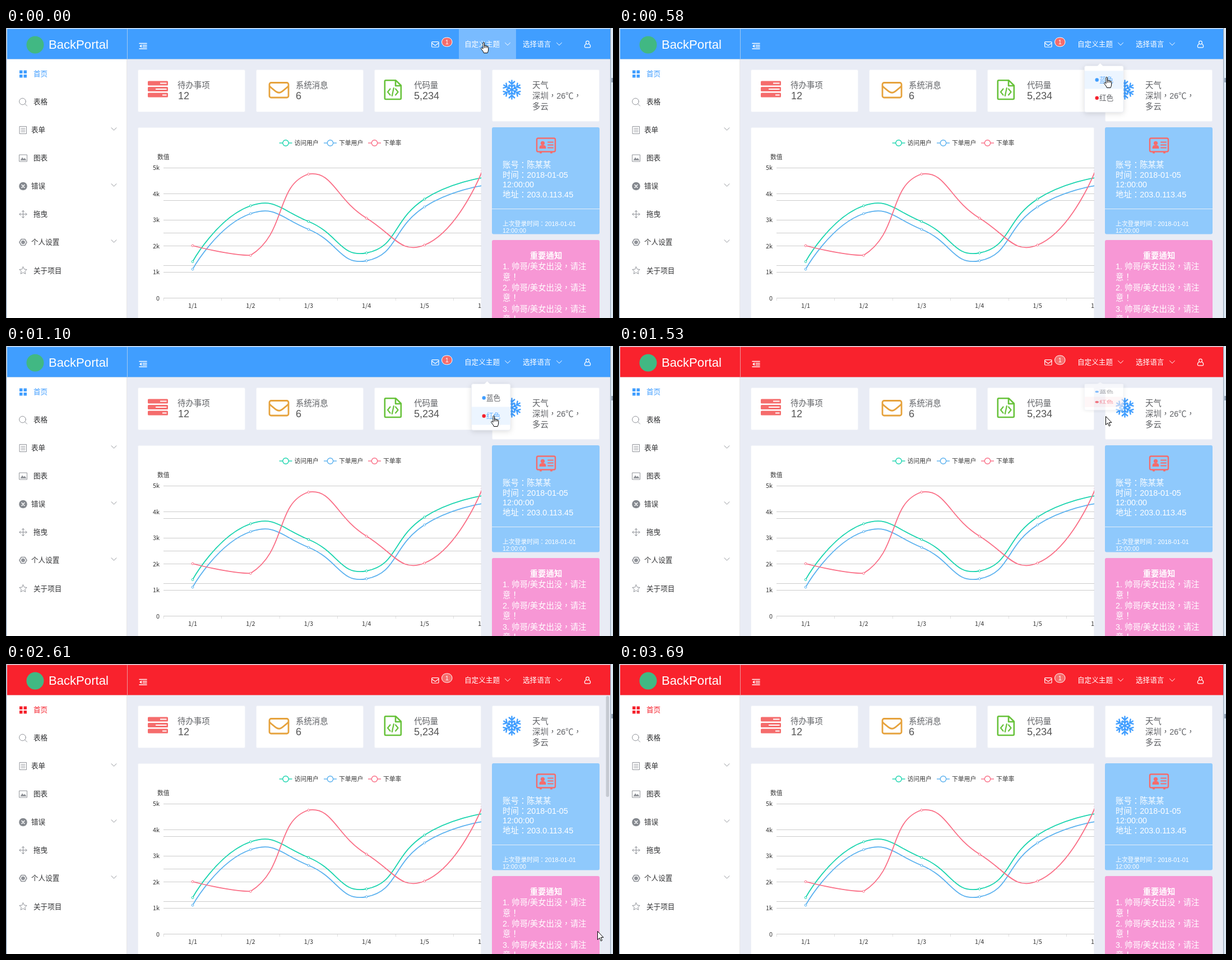
Animation of 1083 by 517 pixels, one loop 3720 ms. Source, as an HTML page:

```html
<!DOCTYPE html>
<html lang="zh-CN">
<head>
<meta charset="utf-8">
<title>Dashboard theme switch</title>
<style>
html, body { margin: 0; height: 100%; overflow: hidden; background: #e9ecf5; }
#stage {
  display: block; width: 100vw; height: 100vh;
  font: 12.6px 'Liberation Sans', 'Noto Sans CJK SC', 'Noto Sans CJK', sans-serif;
  --theme: #409eff; --active: #409eff; --hot: #66b1ff; --hotBg: #ecf5ff;
}
#stage, .play { animation: 3720ms step-end infinite; }
#stage { animation-name: theme; }
.line { fill: none; stroke: currentColor; stroke-linecap: round; stroke-linejoin: round; }
.white { fill: #fff; color: #fff; }
.side { fill: #303133; color: #909399; }
.active { fill: var(--active); }
/* Traditional forms centre the full-width punctuation. */
.centred { font-family: 'Liberation Sans', 'Noto Sans CJK TC', 'Noto Sans CJK', sans-serif; }
.mid { font-size: 14.4px; fill: #606266; }
.num { font-size: 18px; fill: #555; }
.note { font-size: 14.4px; fill: #fff; }
.small { font-size: 10.8px; fill: #fff; }
.chart { font: 10.8px 'Noto Sans CJK SC', 'Noto Sans CJK', 'Noto Sans', sans-serif; fill: #333; }
.card { fill: #fff; stroke: #f1f3f8; }
#navHover { opacity: 1; animation-name: navHover; }
#menu { opacity: 0; transform-origin: 0 67px; animation-name: menu; }
#menu > rect:first-of-type { filter: drop-shadow(0 2px 5px rgba(0,0,0,.13)); }
#back1 { fill: transparent; animation-name: back1; }
#back2 { fill: transparent; animation-name: back2; }
#item1 { fill: #606266; animation-name: item1; }
#item2 { fill: #606266; animation-name: item2; }
#lift { opacity: 0; filter: drop-shadow(0 2px 5px rgba(0,0,0,.14)); animation-name: lift; }
#scroll { opacity: 0; animation-name: scroll; }
#cursor { fill: #fff; stroke: #000; stroke-linejoin: round; animation-name: move; }
#hand { animation-name: hand; }
#arrow { animation-name: arrow; }

@keyframes theme {
  0% { --theme: #409eff; --active: #409eff; --hot: #66b1ff; --hotBg: #ecf5ff; }
  41.128% { --theme: #f9222d; --active: #409eff; --hot: #f5485a; --hotBg: #fdf0f2; }
  45.161% { --theme: #f9222d; --active: #a25d92; --hot: #f5485a; --hotBg: #fdf0f2; }
  48.655%, 100% { --theme: #f9222d; --active: #f5222d; --hot: #f5485a; --hotBg: #fdf0f2; }
}
@keyframes navHover { 0% { opacity: 1 } 12.365% { opacity: .5 } 15.591%, 100% { opacity: 0 } }
@keyframes menu {
  0% { opacity: 0; transform: scaleY(.9) }
  4.301% { opacity: .85; transform: scaleY(.92) }
  8.333% { opacity: 1; transform: none }
  41.128% { opacity: .6; transform: scaleY(.57) }
  45.161%, 100% { opacity: 0; transform: scaleY(.1) }
}
@keyframes back1 { 0%, 22.043% { fill: transparent } 15.591% { fill: var(--hotBg) } }
@keyframes item1 { 0%, 22.043% { fill: #606266 } 15.591% { fill: var(--hot) } }
@keyframes back2 { 0% { fill: transparent } 22.043%, 100% { fill: var(--hotBg) } }
@keyframes item2 { 0% { fill: #606266 } 22.043%, 100% { fill: var(--hot) } }
@keyframes lift { 0%, 62.903% { opacity: 0 } 45.161% { opacity: .5 } 48.655% { opacity: 1 } }
@keyframes scroll {
  0%, 99.193%, 100% { opacity: 0 }
  45.161% { opacity: .5 } 48.655% { opacity: 1 } 81.182% { opacity: .18 }
}
@keyframes hand { 0%, 15.591% { visibility: visible } 12.365%, 41.128%, 100% { visibility: hidden } }
@keyframes arrow { 0%, 15.591%, 77.15%, 100% { visibility: hidden } 12.365%, 41.128% { visibility: visible } }
@keyframes move {
  0% { transform: translate(847px, 25px) }
  12.365% { transform: translate(864px, 61px) }
  15.591% { transform: translate(865px, 87px) }
  18.817% { transform: translate(865px, 100px) }
  22.043% { transform: translate(865px, 112px) }
  25.268% { transform: translate(865px, 121px) }
  29.569% { transform: translate(865px, 124px) }
  41.128% { transform: translate(868px, 125px) }
  48.655% { transform: translate(868px, 107px) }
  55.645% { transform: translate(868px, 126px) }
  58.87% { transform: translate(955px, 197px) }
  62.903% { transform: translate(1000px, 300px) }
  66.129% { transform: translate(1046px, 432px) }
  70.161% { transform: translate(1055px, 476px) }
  73.387%, 100% { transform: translate(1061px, 507px) }
}
</style>
</head>
<body>
<svg id="stage" viewBox="0 0 1083 517" preserveAspectRatio="none">
  <defs>
    <path id="down" class="line" d="M-4.5-2.2 0 2.2 4.5-2.2"/>
    <clipPath id="plot"><path d="M235 177H848V517H235z"/></clipPath>
  </defs>

  <!-- window edge -->
  <path fill="#dce8f4" d="M0 0H1083V517H0z"/>
  <path fill="#8d9db0" d="M0 0H1V517H0zM1078 0H1079V517H1078zM1080 89H1083V97H1080z"/>
  <path fill="#e9ecf5" d="M2 1H1078V517H2z"/>
  <path fill="#fff" d="M2 56H216V517H2z"/>
  <path fill="#e6e6e6" d="M215 56H216V517H215z"/>

  <!-- header -->
  <path fill="var(--theme)" d="M2 1.5H1078V56H2z"/>
  <path id="navHover" class="play" fill="#79bbff" d="M808 2H910V55H808z"/>
  <path fill="#e6e6e6" fill-opacity=".6" d="M2 55H1078V56H2zM216 1.5H217V55H216z"/>
  <circle cx="52" cy="30" r="15.5" fill="#41b883"/>
  <g class="white">
    <text x="76" y="36.5" font-size="22.1">BackPortal</text>
    <path class="line" stroke-width="1.6" stroke-linecap="butt" d="M238 27.5H251M244 30.7H251M244 33.8H251M238 37H251"/>
    <path d="M242 29.3V35.2L238 32.2z"/>
    <g class="line" stroke-width="1.2">
      <rect x="759.6" y="24.6" width="12.4" height="9.4" rx="1.2"/>
      <path d="M760 27 765.8 31.2 771.6 27"/>
      <circle cx="1037.5" cy="26" r="2.8"/>
      <path d="M1034.7 28.5C1032 30 1032.2 32 1032.4 33.3Q1032.7 34.8 1034 34.8H1041Q1042.4 34.8 1042.6 33.3C1042.8 32 1043 30 1040.3 28.5"/>
    </g>
    <rect x="777.5" y="17" width="18.5" height="16" rx="8" fill="#f56c6c" stroke="#fff"/>
    <text x="786.7" y="29" font-size="10.8" text-anchor="middle">1</text>
    <text x="818" y="33.2">自定义主题</text>
    <text x="922" y="33.2">选择语言</text>
    <use href="#down" x="895" y="28.5"/><use href="#down" x="987" y="28.5"/>
  </g>

  <!-- sidebar -->
  <g class="side">
    <path class="active" d="M24 75.5h5.5v5.5H24zM31.5 75.5H37V81H31.5zM24 83h5.5v5.5H24zM31.5 83H37v5.5H31.5z"/>
    <text class="active" x="49" y="85.7">首页</text>
    <text x="49" y="135.7">表格</text>
    <text x="45" y="185.7">表单</text>
    <text x="49" y="235.7">图表</text>
    <text x="45" y="285.7">错误</text>
    <text x="49" y="335.7">拖曳</text>
    <text x="45" y="385.7">个人设置</text>
    <text x="49" y="436.5">关于项目</text>
    <g class="line">
      <circle cx="29.5" cy="131" r="5.8"/><path d="M33.7 135.2 37.5 139"/>
      <path d="M24.5 175.5H36.5V188.5H24.5zM27 179H34M27 182H34M27 185H34"/>
      <path d="M24 226H37.5V238H24z"/>
      <path d="M30.5 325.5V338.5M24 332H37M28.5 327.5 30.5 325.3 32.5 327.5M28.5 336.5 30.5 338.7 32.5 336.5M26 330 23.8 332 26 334M35 330 37.2 332 35 334"/>
      <path stroke-width="1.6" d="M27.3 376.5H33.7L37 382 33.7 387.5H27.3L24 382z"/>
      <circle cx="30.5" cy="382" r="3" fill="#909399"/>
      <path d="M30.5 425.7 32.5 430 37.2 430.5 33.7 433.7 34.7 438.3 30.5 436 26.3 438.3 27.3 433.7 23.8 430.5 28.5 430z"/>
    </g>
    <path fill="#909399" d="M25.5 236 29 230.5 31.5 233.5 33.5 231.5 36.5 236z"/>
    <circle cx="30.5" cy="282" r="7.3" fill="#85898f"/>
    <path class="line white" stroke-width="1.5" d="M28 279.5 33 284.5M33 279.5 28 284.5"/>
    <use href="#down" x="192.5" y="180"/><use href="#down" x="192.5" y="280"/><use href="#down" x="192.5" y="380"/>
  </g>

  <!-- summary cards -->
  <g class="card">
    <rect x="235.5" y="74.5" width="191" height="75" rx="2"/>
    <rect x="446.5" y="74.5" width="191" height="75" rx="2"/>
    <rect x="657.5" y="74.5" width="190" height="75" rx="2"/>
    <rect id="lift" class="play" x="867.5" y="74.5" width="191" height="92" rx="2"/>
    <rect x="867.5" y="74.5" width="191" height="92" rx="2"/>
    <rect x="235.5" y="177.5" width="612" height="345" rx="2"/>
  </g>
  <g fill="#f56c6c">
    <rect x="253" y="94.5" width="36" height="8" rx="1.5"/>
    <rect x="253" y="105" width="36" height="8" rx="1.5"/>
    <rect x="253" y="115.5" width="36" height="8" rx="1.5"/>
    <path fill="#fff" d="M275 97.5H286.5V99.5H275zM267 108H286.5V110H267zM279 118.5H286.5V120.5H279z"/>
  </g>
  <g class="line" color="#e6a23c" stroke-width="2.8">
    <rect x="470" y="97.5" width="34" height="26.5" rx="3"/>
    <path d="M470.5 104C475 108.5 479 111 482 113.5Q487 117 492 113.5C495 111 499 108.5 503.5 104"/>
  </g>
  <g class="line" color="#67c23a" stroke-width="2.6">
    <path d="M677.5 93.3H695.5L704.8 102.5V125Q704.8 127 702.8 127H677.5Q675.8 127 675.8 125V95Q675.8 93.3 677.5 93.3zM695 94V103H704"/>
    <path stroke-width="2.2" d="M685.5 108.5 681 114 685.5 119.5M695 108.5 699.5 114 695 119.5M691.8 107 688.8 121"/>
  </g>
  <g id="flake" class="line" color="#409eff" stroke-width="2.4"></g>
  <text class="mid" x="306" y="107.3">待办事项</text><text class="num" x="307" y="127">12</text>
  <text class="mid" x="517" y="107.3">系统消息</text><text class="num" x="517" y="127">6</text>
  <text class="mid" x="728" y="107.3">代码量</text><text class="num" x="728" y="127">5,234</text>
  <g class="centred" lang="zh-Hant">
    <text class="mid" x="939" y="107.3">天气</text>
    <text class="mid" x="939" y="126.3">深圳，26℃，</text>
    <text class="mid" x="939" y="145.3">多云</text>
  </g>

  <!-- account and notices -->
  <rect x="867" y="177" width="192" height="190.5" rx="3" fill="#8fc9fc"/>
  <g color="#f56c6c" fill="#f56c6c">
    <rect class="line" x="947" y="196.5" width="33" height="24" rx="2.5" stroke-width="2.4"/>
    <circle cx="957.5" cy="205.3" r="3.6"/>
    <path d="M951.5 215Q951.5 209 955 209H960Q963.5 209 963.5 215zM952 221H956V223.5H952zM971 221H975V223.5H971z"/>
    <path class="line" stroke-width="2" d="M967 203.5H976M967 208.5H976M967 213.5H976"/>
  </g>
  <path fill="#e4eef8" d="M867 322H1059V323H867z"/>
  <rect x="867" y="378" width="192" height="150" rx="3" fill="#f797d5"/>
  <g id="notes" class="centred" lang="zh-Hant">
    <text class="note" x="886" y="248.5">账号：陈某某</text>
    <text class="note" x="886" y="267">时间：2018-01-05</text>
    <text class="note" x="886" y="283.5">12:00:00</text>
    <text class="note" x="886" y="302">地址：203.0.113.45</text>
    <text class="small" x="886" y="352.5">上次登录时间：2018-01-01</text>
    <text class="small" x="886" y="364.7">12:00:00</text>
    <text class="note" x="963.5" y="411.3" text-anchor="middle" font-weight="700">重要通知</text>
  </g>

  <g id="chart" class="chart" clip-path="url(#plot)"><text x="270" y="234">数值</text></g>

  <rect id="scroll" class="play" x="1070.5" y="57" width="5.5" height="180" rx="2.7" fill="#c5c9d1"/>

  <g id="menu" class="play">
    <rect x="830.5" y="67.5" width="69.5" height="82.5" rx="3" fill="#fff" stroke="#ebeef5"/>
    <path fill="#fff" d="M853 68.5 858.5 63 864 68.5z"/>
    <rect id="back1" class="play" x="831" y="76.5" width="68.5" height="32"/>
    <rect id="back2" class="play" x="831" y="108.5" width="68.5" height="32"/>
    <circle cx="852.7" cy="92.5" r="3.2" fill="#409eff"/>
    <circle cx="852.7" cy="124.8" r="3.2" fill="#f5222d"/>
    <text id="item1" class="play" x="857" y="97">蓝色</text>
    <text id="item2" class="play" x="857" y="129.2">红色</text>
  </g>

  <g id="cursor" class="play">
    <g id="hand" class="play">
      <path d="M4 12V1.8Q4 .5 5.2 .5T6.5 1.8V7Q6.8 6 7.8 6T9 7.3Q9.3 6.7 10.2 6.8T11.5 8.2Q11.8 7.7 12.6 7.8T13.7 9.2V14Q13.5 16.5 12 19.5H5.5Q4.5 16.5 1 12.5 .2 11.3 1 10.6T2.6 10.7z"/>
      <path fill="none" d="M6.5 7V10.5M9 7.3V10.5M11.5 8.2V10.5"/>
    </g>
    <path id="arrow" class="play" d="M.5 .5V15.5L4 12.3 6.4 17.8 8.6 16.8 6.3 11.4H10.9z"/>
  </g>
</svg>
<script>
const add = (parent, tag, attrs, text = '') => {
  const node = document.createElementNS('http://www.w3.org/2000/svg', tag);
  for (const key in attrs) node.setAttribute(key, attrs[key]);
  node.textContent = text;
  return parent.appendChild(node);
};
const byId = id => document.getElementById(id);

for (let i = 0; i < 6; i++) {
  add(byId('flake'), 'path', {
    d: 'M0 0V-16.5M-4.8-14.5 0-10 4.8-14.5M-3.8-8.3 0-5 3.8-8.3',
    transform: `translate(902.5 110) rotate(${i * 60})`
  });
}

for (let i = 0; i < 3; i++) {
  const y = 430.3 + i * 37.7;
  add(byId('notes'), 'text', { class: 'note', x: 886, y }, `${i + 1}. 帅哥/美女出没，请注`);
  add(byId('notes'), 'text', { class: 'note', x: 886, y: y + 18.3 }, '意！');
}

const plot = byId('chart');
const plotTop = 249, plotBase = 481.5, plotLeft = 281, step = 103.4;
const level = part => plotBase - (plotBase - plotTop) * part;
const rule = y => add(plot, 'path', { d: `M${plotLeft} ${Math.floor(y) + .5}H848`, stroke: '#ccc' });
for (let i = 0; i <= 5; i++) {
  const y = level(i / 5);
  rule(y);
  add(plot, 'text', { x: 274, y: y + 4, 'text-anchor': 'end' }, i ? i + 'k' : '0');
  add(plot, 'path', { d: `M${Math.round(plotLeft + step * i) + .5} 482V486`, stroke: '#ddd' });
  add(plot, 'text', { x: 333 + step * i, y: 498.5, 'text-anchor': 'middle' }, `1/${i + 1}`);
}
for (let i = 1; i < 4; i++) rule(level(i / 4));

// Smooth line: handles follow the neighbours' chord and stay inside the value range.
function smooth(points) {
  const ys = points.map(p => p[1]), low = Math.min(...ys), high = Math.max(...ys);
  const dist = (a, b) => Math.hypot(a[0] - b[0], a[1] - b[1]);
  const handles = points.map((p, i) => {
    const before = points[i - 1], after = points[i + 1];
    if (!before || !after) return [p, p];
    const ratio = dist(p, after) / (dist(p, after) + dist(p, before));
    const at = k => [p[0] + (after[0] - before[0]) * k,
      Math.min(high, Math.max(low, p[1] + (after[1] - before[1]) * k))];
    return [at((ratio - 1) / 2), at(ratio / 2)];
  });
  return 'M' + points[0] + points.slice(1).map((p, i) => `C${handles[i][1]} ${handles[i + 1][0]} ${p}`).join('');
}

const series = [
  { name: '访问用户', color: '#19d4ae', x: 499, ys: [416.5, 317, 345, 401, 305, 267] },
  { name: '下单用户', color: '#5ab1ef', x: 578.5, ys: [430, 331, 359, 415, 319, 281] },
  { name: '下单率', color: '#fa6e86', x: 657.5, ys: [388, 405.3, 260.5, 339, 387, 254] }
];
for (const { name, color, x, ys } of series) {
  const pen = { stroke: color, fill: 'none', 'stroke-width': 1.8 };
  const dot = { stroke: color, fill: '#fff' };
  const points = ys.map((y, i) => [333 + step * i, y]);
  add(plot, 'path', { ...pen, d: smooth(points) });
  for (const [cx, cy] of points) add(plot, 'circle', { ...dot, cx, cy, r: 1.9 });
  add(plot, 'path', { ...pen, 'stroke-width': 1.4, d: `M${x - 11.5} 205H${x + 11.5}` });
  add(plot, 'circle', { ...dot, cx: x, cy: 205, r: 5.2, 'stroke-width': 1.4 });
  add(plot, 'text', { x: x + 15.5, y: 209 }, name);
}
</script>
</body>
</html>
```
